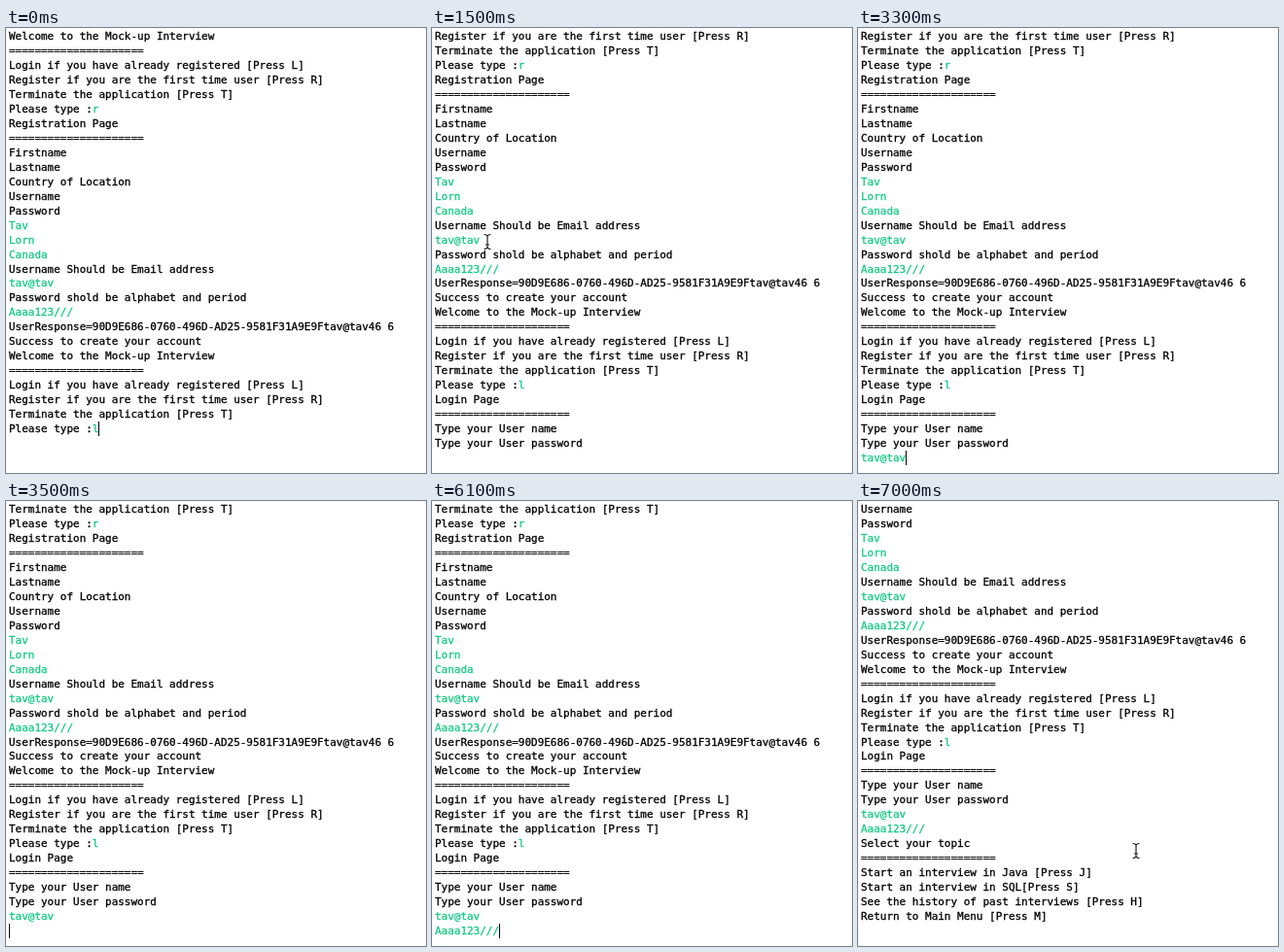
Animation, 432 px wide and 458 px high, one loop 7.3 s. Source, as an HTML page with a canvas:

```html
<!DOCTYPE html>
<html lang="en">
<head>
<meta charset="utf-8">
<title>Console login</title>
<style>
html, body { margin: 0; width: 432px; height: 458px; overflow: hidden; background: #fff; }
canvas { display: block; }
</style>
</head>
<body>
<canvas id="stage" width="432" height="458"></canvas>
<script>
const ctx = document.getElementById('stage').getContext('2d');
const LOOP = 7300, STEP = 100, VISIBLE_ROWS = 30;
const LEFT = 3, CHAR = 6.6, PITCH = 14.97;
const INK = '#000', INPUT = '#14c983', SELECTED = '#add6f5';

// A leading ">" marks a line typed by the user; "|" splits prompt and answer.
const rule = '='.repeat(21);
const menu = answer => `Welcome to the Mock-up Interview
${rule}
Login if you have already registered [Press L]
Register if you are the first time user [Press R]
Terminate the application [Press T]
Please type :|${answer}`;

const registration = `
Registration Page
${rule}
Firstname
Lastname
Country of Location
Username
Password
>Tav
>Lorn
>Canada
Username Should be Email address
>tav@tav
Password shold be alphabet and period
>Aaaa123///
UserResponse=90D9E686-0760-496D-AD25-9581F31A9E9Ftav@tav46 6
Success to create your account
`;

const login = `
Login Page
${rule}
Type your User name
Type your User password
`;

const topics = `
Select your topic
${rule}
Start an interview in Java [Press J]
Start an interview in SQL[Press S]
See the history of past interviews [Press H]
Return to Main Menu [Press M]
`;

const session = [
  { at: 0, text: menu('r') + registration + menu('l') },
  { at: 300, text: login },
  { at: 3300, text: '>tav@tav' },
  { at: 3500, text: '\n' },
  { at: 5800, text: '>Aaaa123///' },
  { at: 6300, text: topics }
];

// Each drag runs leftwards with the pointer and stays selected until cleared.
const drags = [
  { row: 17, start: 1700, end: 2000, clear: 2900 },
  { row: 19, start: 4400, end: 4800, clear: 5500 }
];

// Pointer key points [time, x, y]; it hides between paths, while the user types.
const paths = [
  [[300, 350, 330], [900, 294, 250], [1500, 57, 220], [1700, 56, 219],
   [2000, 0, 217], [2200, 8, 191], [2500, 24, 382], [2900, 45, 449], [3300, 40, 449]],
  [[3600, 40, 449], [4200, 81, 271], [4400, 72, 238], [4700, 2, 236],
   [4800, 0, 236], [5400, 30, 430], [5800, 30, 442]],
  [[6400, 70, 449], [6600, 128, 412], [6700, 286, 360], [LOOP, 286, 360]]
];

const colX = col => LEFT + col * CHAR;
const plain = line => line.replace(/[>|]/g, '');

function pointerAt(t) {
  const path = paths.find(p => t >= p[0][0] && t < p[p.length - 1][0]);
  if (!path) return null;
  const i = path.findIndex(p => p[0] > t);
  const [t0, x0, y0] = path[i - 1], [t1, x1, y1] = path[i];
  const k = (t - t0) / (t1 - t0);
  return { x: Math.round(x0 + (x1 - x0) * k), y: Math.round(y0 + (y1 - y0) * k) };
}

function drawText(text, col, y, color) {
  ctx.fillStyle = ctx.strokeStyle = color;
  ctx.lineWidth = 0.3;
  ctx.fillText(text, colX(col), y);
  ctx.strokeText(text, colX(col), y);
}

function drawLine(line, y) {
  const typed = line[0] === '>';
  const [text, answer = ''] = (typed ? line.slice(1) : line).split('|');
  drawText(text, 0, y, typed ? INPUT : INK);
  drawText(answer, text.length, y, INPUT);
}

function drawCaret(col, top) {
  ctx.fillStyle = INK;
  ctx.fillRect(Math.round(colX(col)), top, 1, 15);
}

function drawPointer({ x, y }) {
  ctx.beginPath();
  for (const s of [-1, 1]) {
    ctx.moveTo(x - 3.5, y + s * 7.5);
    ctx.quadraticCurveTo(x, y + s * 7.5, x, y + s * 5);
    ctx.quadraticCurveTo(x, y + s * 7.5, x + 3.5, y + s * 7.5);
  }
  ctx.moveTo(x, y - 6);
  ctx.lineTo(x, y + 6);
  ctx.moveTo(x - 2, y + 3);
  ctx.lineTo(x + 2, y + 3);
  for (const [color, width] of [['#fff', 3], ['#222', 1.2]]) {
    ctx.strokeStyle = color;
    ctx.lineWidth = width;
    ctx.stroke();
  }
}

function draw(now) {
  const t = Math.floor(now % LOOP / STEP) * STEP;
  const lines = session.filter(s => s.at <= t).map(s => s.text).join('').split('\n');
  const scrolled = Math.max(0, lines.length - VISIBLE_ROWS);
  const rowTop = row => Math.round((row - scrolled) * PITCH) + 1;
  const pointer = pointerAt(t);

  ctx.fillStyle = '#fff';
  ctx.fillRect(0, 0, 432, 458);

  const drag = drags.find(d => t >= d.start && t < d.clear);
  const dragEnd = drag && plain(lines[drag.row]).length;
  const dragHead = drag && Math.min(dragEnd, Math.ceil(pointerAt(Math.min(t, drag.end)).x / CHAR));
  if (drag) {
    ctx.fillStyle = SELECTED;
    ctx.fillRect(colX(dragHead), rowTop(drag.row), (dragEnd - dragHead) * CHAR, 15);
  }

  ctx.font = '10.97px "DejaVu Sans Mono", monospace';
  lines.forEach((line, row) => {
    if (row >= scrolled) drawLine(line, rowTop(row) + 11);
  });

  if (drag && t < drag.end) drawCaret(dragHead, rowTop(drag.row));
  if (!pointer) {
    const last = lines.length - 1;
    drawCaret(plain(lines[last]).length, rowTop(last));
  } else {
    drawPointer(pointer);
  }
}

const begin = performance.now();
function tick() {
  draw(performance.now() - begin);
  requestAnimationFrame(tick);
}
tick();
</script>
</body>
</html>
```
